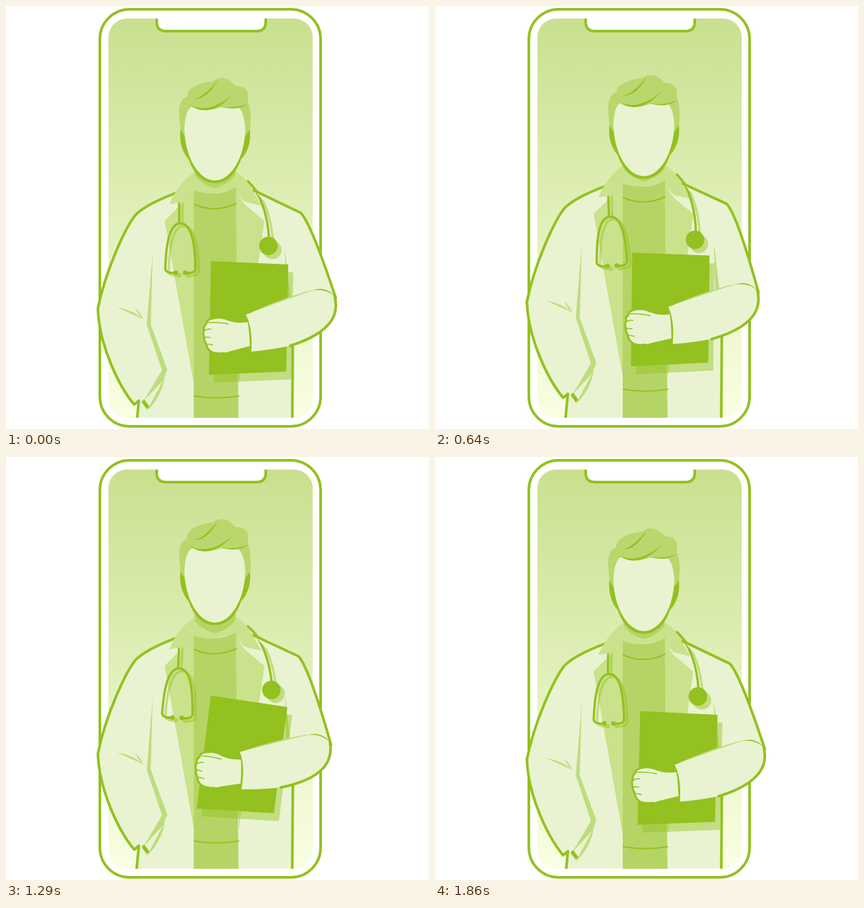
An HTML page that plays this animation: 640 by 640 pixels, repeating every 1930 ms.

```html
<!DOCTYPE html>
<html lang="en">
<head>
<meta charset="utf-8">
<title>Doctor on a phone screen</title>
<style>
  html, body { margin: 0; width: 100%; height: 100%; overflow: hidden; background: #fff; }
  svg { display: block; width: 100%; height: 100%; }
  .main { fill: #93c11f; }
  .pale { fill: #e9f3d2; }
  .soft { fill: #cae28b; }
  .mid { fill: #b9d76d; }
  .knit { fill: #b5d466; }
  .fold { fill: #bfdc7d; }
  .line { fill: none; stroke: #93c11f; stroke-width: 4; stroke-linecap: round; stroke-linejoin: round; }
  .thin { stroke-width: 2; }
  .tube { stroke-width: 3.5; }
  .shade { opacity: .45; }
</style>
</head>
<body>
<svg viewBox="0 0 640 640">
  <defs>
    <linearGradient id="glow" x2="0" y2="1">
      <stop stop-color="#c9e08f"/>
      <stop offset="1" stop-color="#f9ffe3"/>
    </linearGradient>
    <clipPath id="crop"><path d="M0 0H640V623H0Z"/></clipPath>
    <g id="headset">
      <path class="line tube" d="M262 290V329M257 404C250 404 241 404 241 397C242 368 245 329 264 329C283 329 286 368 287 397C287 404 278 404 271 404"/>
      <circle class="main" cx="257" cy="403.500" r="3.500"/>
      <circle class="main" cx="271" cy="403.500" r="3.500"/>
    </g>
    <g id="chest">
      <path class="line tube" d="M366 265C386 284 396 318 398 352"/>
      <circle class="main" cx="397" cy="363" r="14"/>
    </g>
    <path id="card" class="main" d="M310 386L427 391L424 553L307 558Z"/>
  </defs>

  <!-- phone -->
  <rect x="142" y="5" width="334" height="631" rx="45" fill="#fff" stroke="#93c11f" stroke-width="4"/>
  <rect x="155" y="19" width="309" height="604" rx="28" fill="url(#glow)"/>
  <path d="M228 19V24Q228 38 242 38H379Q393 38 393 24V19" fill="#fff" stroke="#93c11f" stroke-width="4"/>

  <g clip-path="url(#crop)">
    <g id="body">
      <!-- coat -->
      <path class="pale" d="M257 283Q212 300 196 316C180 336 150 402 139 458C141 515 172 577 194 603L201 597L196 650H433L434 440L446 313L372 278Z"/>
      <path class="line" d="M257 283Q212 300 196 316C180 336 150 402 139 458C141 515 172 577 194 603L201 597L196 650M434 500L433 650"/>
      <path class="fold" d="M222 373L213 482L236 551L208 598L238 566L244 550L219 482Z"/>
      <path class="fold" d="M240 562Q236 590 213 613Q224 592 240 562Z"/>
      <path class="main" d="M209 595L217 606L213 610L205 599Z"/>
      <path class="fold" d="M168 456Q192 460 208 474Q190 466 168 456ZM195 457Q204 464 208 474Q202 469 195 457Z"/>
      <path class="fold" d="M422 368L431 446L424 446Z"/>

      <!-- lapels, sweater, neck -->
      <path class="soft" d="M284 280L262 303L240 325L284 571ZM348 280L361 300L391 325L383 380L352 572Z"/>
      <path class="knit" d="M284 276Q316 292 348 274L352 650H284Z"/>
      <path class="soft" d="M284 245H348V274Q316 290 284 279Z"/>
      <path class="knit" d="M286 245H347V257Q336 270 316 276Q296 270 286 257Z"/>
      <path class="line thin" d="M285 300Q316 314 348 299M285 590Q318 596 352 590"/>

      <g id="left"><use href="#headset" class="shade" x="5" y="4"/><use href="#headset"/></g>
      <path class="soft" d="M284 252Q260 269 247 300L271 296L284 282ZM348 251Q365 262 372 276L386 302L361 296L348 281Z"/>
      <g id="right"><use href="#chest" class="shade" x="6" y="6"/><use href="#chest"/></g>
    </g>

    <g id="head">
      <path class="mid" d="M262 165C261 145 268 138 278 136H360C371 148 371 165 369 190L362 215H272L264 190Z"/>
      <path class="main" d="M264 187Q261 213 276 232L270 197ZM369 187Q372 213 356 232L362 197Z"/>
      <path class="main" d="M270 192C271 236 288 268 316 268C344 268 361 236 362 192Z"/>
      <path class="pale" d="M270 190C270 168 274 150 290 148H342C356 150 362 168 362 190C360 230 340 264 316 264C292 264 272 230 270 190Z"/>
    </g>
    <g id="hair">
      <path class="mid" d="M275 142Q271 129 286 121Q299 115 313 114Q321 107 333 110Q341 113 347 121Q362 120 366 132Q367 143 364 150Q354 156 325 153Q308 160 290 156Q278 151 275 142Z"/>
      <path class="main" d="M284 141Q301 137 321 111Q305 141 284 141ZM276 149Q307 165 343 134Q309 172 276 149ZM324 152Q350 156 366 147Q352 160 324 152Z"/>
    </g>

    <path id="sleeve" class="pale"/>
    <path id="edge" class="line"/>
    <g id="shadow" class="shade"><use href="#card"/></g>
    <g id="board"><use href="#card"/></g>

    <g id="forearm">
      <path class="fold" d="M372 463Q424 440 462 430L462 438L372 475Z"/>
      <path class="pale" d="M369 478Q347 481 337 476Q325 469 311 473Q303 475 303 481Q298 484 300 490Q297 495 300 501Q299 506 303 511Q303 519 312 524Q325 528 340 522L371 514Z"/>
      <path class="line" stroke-linecap="butt" style="stroke-width:3" d="M337 475Q325 469 311 473Q303 475 303 481Q298 484 300 490Q297 495 300 501Q299 506 303 511Q303 519 312 524Q320 527 330 525"/>
      <path class="line thin" style="stroke-width:1.5" d="M306 479Q320 478 336 481M301 491Q305 488 310 489M301 502Q305 500 309 502M304 512Q308 511 313 513"/>
      <path class="pale" d="M363 467Q424 444 462 431C482 425 500 434 500 454C500 482 470 500 434 513Q404 520 371 523Q372 490 363 467Z"/>
      <path class="line" d="M497 438C503 460 497 478 474 494Q456 506 430 514"/>
      <path class="main" d="M363 467Q374 489 371 523L369 523Q369 488 363 467ZM461 431Q484 422 498 440Q484 426 461 431Z"/>
    </g>
  </g>
</svg>
<script>
  const LOOP = 1930, FPS = 14, COUNT = 27;
  const keys = [0, 4, 7, 11, 18, 22, 26];
  const poses = {
    body:   [0, -4, -7.5, -12, -9, -4, -.4],
    head:   [0, .5, -3, -9.7, -13.5, -7.5, -.6],
    hair:   [0, 3, 0, -9, -15, -9, -1],
    swing:  [0, -2.2, -2.7, -1.1, 2.7, 2.7, .5],
    armX:   [367, 364.5, 360, 353.5, 355, 361, 366.5],
    armY:   [495, 494, 488.5, 479, 474.5, 485, 493.5],
    armA:   [0, -1, 0, 3, 6, 4, .6],
    boardX: [367, 363.3, 358.5, 354.5, 357.3, 363, 367],
    boardY: [472, 470, 463.5, 455.3, 452.5, 462, 470.8],
    boardA: [0, -3.4, -3.4, 2.7, 6.1, 3.8, .3]
  };
  const el = id => document.getElementById(id);
  const move = (id, value) => el(id).setAttribute('transform', value);
  const place = (x, y, angle, cx, cy) =>
    `translate(${x} ${y}) rotate(${angle}) translate(${-cx} ${-cy})`;

  // Periodic cubic curve through the key poses
  function curve(values, k) {
    const n = keys.length;
    const time = i => keys[(i + n) % n] + COUNT * Math.floor(i / n);
    const value = i => values[(i + n) % n];
    const slope = i => (value(i + 1) - value(i - 1)) / (time(i + 1) - time(i - 1));
    let i = n - 1;
    while (keys[i] > k) i--;
    const span = time(i + 1) - time(i), u = (k - time(i)) / span, w = 1 - u;
    return w * w * ((1 + 2 * u) * value(i) + u * span * slope(i))
         + u * u * ((3 - 2 * u) * value(i + 1) - w * span * slope(i + 1));
  }

  function drawSleeve(p) {
    const a = p.armA * Math.PI / 180, dx = 132, dy = -53;
    const ex = p.armX + dx * Math.cos(a) - dy * Math.sin(a);
    const ey = p.armY + dx * Math.sin(a) + dy * Math.cos(a);
    const lean = ex - 499;
    const sx = 446 + lean * .5, sy = 313 + lean * .35 + p.body;
    const outer = `M375 ${279 + p.body}L${sx} ${sy}Q${sx + 16} ${sy + 17} ${ex} ${ey}`;
    el('sleeve').setAttribute('d', `${outer}L${ex - 30} ${ey + 30}L434 ${p.armY - 5}V${340 + p.body}Z`);
    el('edge').setAttribute('d', outer);
  }

  function draw(k) {
    const p = {};
    for (const name in poses) p[name] = curve(poses[name], k);
    for (const id of ['body', 'head', 'hair']) move(id, `translate(0 ${p[id]})`);
    move('left', `rotate(${p.swing} 262 295)`);
    move('right', `rotate(${-p.swing} 366 265)`);
    move('forearm', place(p.armX, p.armY, p.armA, 367, 495));
    move('board', place(p.boardX, p.boardY, p.boardA, 367, 472));
    move('shadow', place(p.boardX + 7.5, p.boardY + 12, p.boardA, 367, 472));
    drawSleeve(p);
  }

  const start = performance.now();
  function tick() {
    const t = Math.max(0, performance.now() - start) % LOOP;
    // 14 pictures a second, changing on whole hundredths
    draw(Math.min(COUNT - 1, Math.floor((Math.floor(t / 10) * 10 + 5) * FPS / 1000)));
    requestAnimationFrame(tick);
  }
  tick();
</script>
</body>
</html>
```
